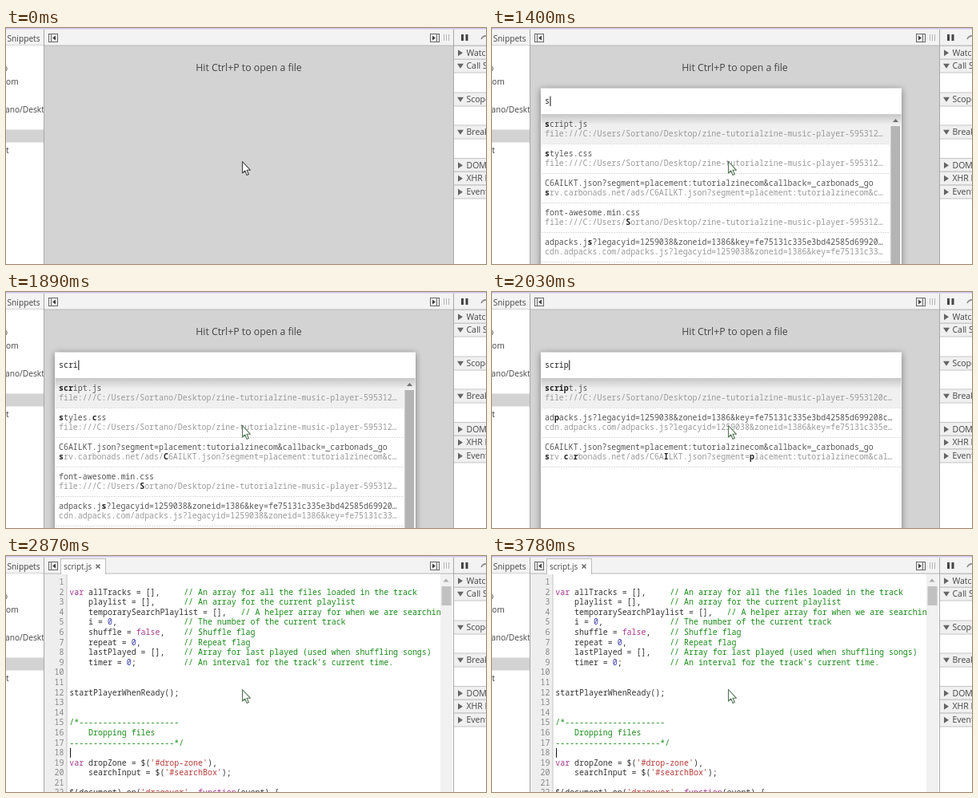
Recreate the animation shown at these times as an HTML page. Size 600 by 296 pixels, loop 3920 ms.

```html
<!DOCTYPE html>
<html lang="en">
<head>
<meta charset="utf-8">
<title>Open a file</title>
<style>
html, body { margin: 0; width: 100%; height: 100%; overflow: hidden; background: #fff; }
svg { display: block; width: 600px; height: 296px; }
text { white-space: pre; }
.ui { font-family: "Open Sans", "Noto Sans", sans-serif; font-size: 10.2px; fill: #444; }
.mono { font-family: "Noto Sans Mono", "DejaVu Sans Mono", monospace; font-size: 9.93px; }
.b { font-weight: 600; fill: #222; }
.note { fill: #1a8a1a; }
.word { fill: #a8388f; }
.str { fill: #b83a3a; }
.num { fill: #3a3ab0; }
</style>
</head>
<body>
<svg id="stage" viewBox="0 0 600 296" xmlns="http://www.w3.org/2000/svg"></svg>
<script>
const LOOP = 3920, CH = 5.96;
const stage = document.getElementById('stage');

const esc = s => s.replace(/&/g, '&amp;').replace(/</g, '&lt;');
const rect = (x, y, w, h, fill, more = '') =>
  `<rect x="${x}" y="${y}" width="${w}" height="${h}" fill="${fill}" ${more}/>`;
const path = (d, fill, more = '') => `<path d="${d}" fill="${fill}" ${more}/>`;
const text = (x, y, cls, body, more = '') =>
  `<text x="${x}" y="${y}" class="${cls}" ${more}>${body}</text>`;
const span = (cls, body) => `<tspan class="${cls}">${body}</tspan>`;
const group = (id, body, more = '') => `<g id="${id}" ${more}>${body}</g>`;

// ---- file search data
const HOME = 'file:///C:/Users/Sortano/Desktop/zine-tutorialzine-music-player-5953120c';
const KEY = 'adpacks.js?legacyid=1259038&zoneid=1386&key=fe75131c335e3bd42585d699208c0a';
const SEG = 'C6AILKT.json?segment=placement:tutorialzinecom&callback=_carbonads_go';
const local = name => [name, HOME + '/' + name];
const files = {
  index: local('index.html'),
  id3: local('id3-minimized.js'),
  jquery: local('jquery-1.11.2.min.js'),
  script: local('script.js'),
  styles: local('styles.css'),
  font: local('font-awesome.min.css'),
  ads: [KEY, 'cdn.adpacks.com/' + KEY],
  seg: [SEG, 'srv.carbonads.net/ads/' + SEG]
};

// each row: file, bold columns in the name, bold columns in the path
const many = n => [
  ['script', [0, 1, 2, 3].slice(0, n)],
  ['styles', n > 1 ? [0, 7] : [0]],
  ['seg', [], n > 1 ? [0, 22] : [0]],
  ['font', [], [17]],
  ['ads', [9]]
];
const few = n => [
  ['script', [0, 1, 2, 3, 4].slice(0, n)],
  ['ads', n > 4 ? [2] : []],
  ['seg', [], [0, 4, 6, 25, 43].slice(0, n)]
];
const lists = {
  all: ['index', 'id3', 'jquery', 'script', 'styles'].map(k => [k]),
  s: many(1), sc: many(2), scr: many(3),
  scri: few(4), scrip: few(5)
};

// time, view, typed text, list, caret shown
const steps = [
  [0, 'idle', '', '', false],
  [840, 'dialog', '', 'all', true],
  [1260, 'dialog', '', 'all', false],
  [1400, 'dialog', 's', 's', true],
  [1540, 'dialog', 'sc', 's', true],
  [1610, 'dialog', 'sc', 'sc', true],
  [1750, 'dialog', 'scr', 'scr', true],
  [1890, 'dialog', 'scri', 'scr', true],
  [1960, 'dialog', 'scri', 'scri', true],
  [2030, 'dialog', 'scrip', 'scrip', true],
  [2450, 'dialog', 'scrip', 'scrip', false],
  [2870, 'editor', '', '', true],
  [3290, 'editor', '', '', false],
  [3780, 'editor', '', '', true]
];

const clip = (s, max) => s.length > max ? s.slice(0, max - 1) + '…' : s;
const marked = (s, bold = []) => [...s].map((c, i) =>
  bold.includes(i) ? span('b', esc(c)) : esc(c)).join('');

function listSvg(rows) {
  const scroll = rows.length > 3;
  const right = scroll ? 497 : 511.5, max = scroll ? 71 : 73;
  let out = rect(61.5, 108, right - 61.5, 37, '#f0f0f0');
  rows.forEach(([key, nameBold, pathBold], i) => {
    const y = 108 + 37 * i;
    out += text(66, y + 15.8, 'mono', marked(clip(files[key][0], max), nameBold), 'fill="#555"');
    out += text(66, y + 28, 'mono', marked(clip(files[key][1], max), pathBold), 'fill="#999"');
    out += path(`M62 ${y + 37.5}H${right}`, 'none', 'stroke="#ddd" stroke-dasharray="2 1"');
  });
  if (scroll) {
    out += rect(497, 108, 14.5, 188, '#f1f1f1') + path('M501 118l3.5-4 3.5 4z', '#777') +
      rect(498.5, 123, 11.5, 173, '#b4b4b4');
  }
  return out + rect(61.5, 108, 450, 14, 'url(#shade)');
}

// ---- code view
const decl = (code, note) => '    ' + (code + ',').padEnd(20) + '// ' + note;
const code = [
  '',
  'var allTracks = [],     // An array for all the files loaded in the track',
  decl('playlist = []', 'An array for the current playlist'),
  '    temporarySearchPlaylist = [],   // A helper array for when we are searching',
  decl('i = 0', 'The number of the current track'),
  decl('shuffle = false', 'Shuffle flag'),
  decl('repeat = 0', 'Repeat flag'),
  decl('lastPlayed = []', 'Array for last played (used when shuffling songs)'),
  decl('timer = 0', "An interval for the track's current time.").replace('0,', '0;'),
  '', '',
  'startPlayerWhenReady();',
  '', '',
  '/*' + '-'.repeat(21),
  '    Dropping files',
  '-'.repeat(22) + '*/',
  '',
  "var dropZone = $('#drop-zone'),",
  "    searchInput = $('#searchBox');",
  '',
  "$(document).on('dragover', function(event) {"
];
const kind = s => s[0] === '/' ? 'note' : s[0] === "'" ? 'str' : s === '0' ? 'num' : 'word';
const tint = (line, i) => i > 13 && i < 17 ? span('note', line) :
  esc(line).replace(/\/\/.*|'[^']*'|\b(var|function|false)\b|\b0\b/g, m => span(kind(m), m));
const lineY = i => 36.1 + 12.59 * i;

function editorSvg() {
  let out = rect(48, 22, 511, 274, '#fff') + rect(48, 22, 28, 274, '#eee') +
    rect(75.5, 22, 1, 274, '#c4c4c4');
  code.forEach((line, i) => {
    out += text(72.5, lineY(i), 'mono', i + 1, 'text-anchor="end" fill="#888"');
    out += text(79.3, lineY(i), 'mono', tint(line, i), 'fill="#333" clip-path="url(#codeArea)"');
  });
  out += rect(543, 22, 15, 274, '#f1f1f1') + path('M546.5 32.5l3.5-4 3.5 4z', '#aaa') +
    rect(544.5, 38, 12, 24, '#c1c1c1');
  return out + group('codeCaret', rect(80, lineY(17) - 9.3, 1, 12, '#111'));
}

// ---- surrounding panels
function tabSvg() {
  return rect(68.5, 3.5, 56, 19, '#fff', 'stroke="#bbb"') + rect(69, 21, 55, 2, '#fff') +
    text(72, 16.5, 'ui', 'script.js', 'style="font-size:9.9px"') +
    path('M112.5 10.5l5 5m0-5l-5 5', 'none', 'stroke="#666" stroke-width="1.5"');
}

const toggleIcon = (x, dir) =>
  rect(x + .5, 7.5, 11, 10, '#f3f3f3', 'stroke="#666"') +
  (dir < 0 ? path(`M${x + 3.5} 8v9`, 'none', 'stroke="#666"') + path(`M${x + 9} 9.5v6l-4-3z`, '#444')
    : path(`M${x + 8.5} 8v9`, 'none', 'stroke="#666"') + path(`M${x + 3} 9.5v6l4-3z`, '#444'));

function toolbarSvg() {
  return rect(0, 0, 600, 22, '#f3f3f3') + rect(0, 0, 600, 1.5, '#cdc6e8') +
    rect(0, 21.5, 600, 1, '#b8b8b8') + toggleIcon(53, -1) + toggleIcon(530, 1) +
    [547, 550, 553].map(x => rect(x, 8, 1, 8, '#b5b5b5')).join('') +
    rect(569, 8, 3, 8, '#444') + rect(574.5, 8, 3, 8, '#444') +
    path('M594 14q2-5 8-4', 'none', 'stroke="#888" stroke-width="1.6"') +
    text(1.5, 16.5, 'ui', 'Snippets');
}

function leftSvg() {
  const rows = [[-4, 54, 'o'], [0, 71, 'om'], [-1, 105.5, 'ano/Deskt'], [0, 156.5, 't']];
  return rect(0, 22, 47, 274, '#fff') + rect(0, 127.5, 47, 16, '#d3d3d3') +
    rows.map(([x, y, s]) => text(x, y, 'ui', s)).join('');
}

function rightSvg() {
  const rows = [[23, 'Watch'], [39.5, 'Call Stack', 1], [81.5, 'Scope', 1],
    [122.5, 'Breakpoints', 1], [164, 'DOM Breakpoints'], [180.5, 'XHR Breakpoints'],
    [197.5, 'Event Listeners']];
  return rect(560, 22, 40, 274, '#fff') + rows.map(([y, label, open]) => {
    const m = y + 8.3;
    return rect(560, y, 40, 16.5, '#f0f0f0') + rect(560, y + 16, 40, 1, '#c4c4c4') +
      rect(560, y - 1, 40, 1, '#c4c4c4') +
      path(open ? `M564 ${m - 3}h8l-4 6z` : `M565 ${m - 4}v8l6-4z`, '#666') +
      text(575.5, m + 3.6, 'ui', label, 'style="font-size:10.5px"');
  }).join('');
}

stage.innerHTML = `<defs>
  <clipPath id="codeArea"><rect x="76" y="22" width="467" height="274"/></clipPath>
  <clipPath id="leftArea"><rect y="0" width="47" height="296"/></clipPath>
  <filter id="soft" x="-10%" y="-10%" width="120%" height="120%"><feGaussianBlur stdDeviation="4"/></filter>
  <linearGradient id="shade" x2="0" y2="1">
    <stop stop-opacity=".17"/><stop offset="1" stop-opacity="0"/>
  </linearGradient>
</defs>` +
  rect(0, 0, 600, 296, '#d3d3d3') +
  text(303.5, 53.5, 'ui', 'Hit Ctrl+P to open a file', 'text-anchor="middle" style="font-size:12.3px"') +
  group('dialog',
    rect(61, 77, 451, 240, '#000', 'opacity=".42" filter="url(#soft)"') +
    rect(61, 75.5, 451, 230, '#fff') +
    text(66, 95.3, 'mono', '', 'id="query" fill="#222"') +
    rect(0, 85.5, 1, 12.5, '#111', 'id="caret"') +
    group('list', '')) +
  group('editor', editorSvg()) +
  toolbarSvg() + group('tab', tabSvg()) +
  group('left', leftSvg(), 'clip-path="url(#leftArea)"') + rightSvg() +
  rect(47, 2, 1, 294, '#a8a8a8') + rect(559, 2, 1, 294, '#a8a8a8') +
  path('M295.5 167.5v14.5l3.3-3 2.3 5.6 2.3-1-2.3-5.3h4.4z', '#fff',
    'id="pointer" stroke-width="1.1" stroke-linejoin="round"');

const el = {};
for (const id of ['dialog', 'editor', 'tab', 'query', 'caret', 'list', 'codeCaret', 'pointer'])
  el[id] = document.getElementById(id);
const show = (node, on) => node.setAttribute('display', on ? 'inline' : 'none');

let shownStep;
function draw(t) {
  const step = steps.filter(s => s[0] <= t).pop();
  if (step === shownStep) return;
  shownStep = step;
  const [, view, typed, list, caret] = step;
  show(el.dialog, view === 'dialog');
  show(el.editor, view === 'editor');
  show(el.tab, view === 'editor');
  show(el.caret, caret);
  show(el.codeCaret, caret);
  el.query.textContent = typed;
  el.caret.setAttribute('x', 66.5 + CH * typed.length);
  el.caret.setAttribute('fill', typed ? '#111' : '#1f7f1f');
  el.list.innerHTML = list ? listSvg(lists[list]) : '';
  el.pointer.setAttribute('stroke', view === 'idle' ? '#444' : '#547554');
}

const start = performance.now();
function tick() {
  draw((performance.now() - start) % LOOP);
  requestAnimationFrame(tick);
}
draw(0);
requestAnimationFrame(tick);
</script>
</body>
</html>
```
